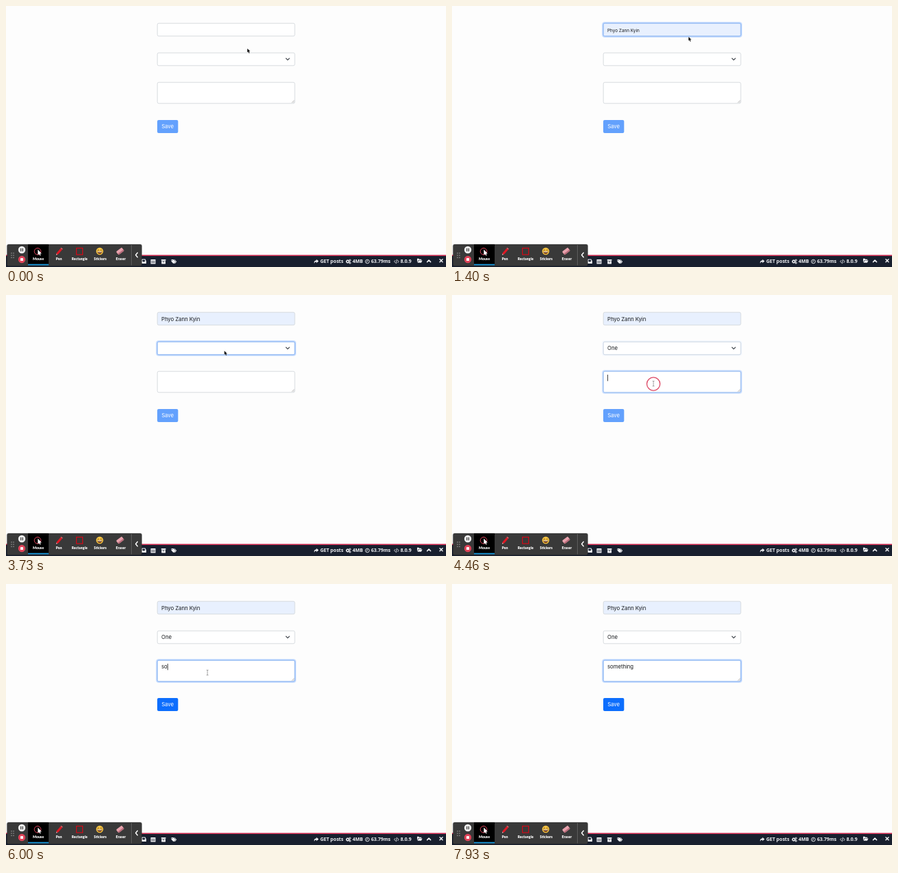
Write an HTML page that moves like this. It is 640 by 380 pixels and loops after 8000 ms.

```html
<!DOCTYPE html>
<html lang="en">
<head>
<meta charset="utf-8">
<title>Form demo</title>
<style>
  html, body { margin: 0; width: 100%; height: 100%; overflow: hidden; background: #fdfdfd; }
  svg { display: block; width: 640px; height: 380px; }
  .form { font: 7.7px Inter, sans-serif; fill: #15181b; }
  .box { fill: #fff; stroke: #ced3d9; stroke-width: .8; }
  .glow { fill: none; stroke: #0d6efd; stroke-opacity: .25; stroke-width: 2; }
  .edge { fill: none; stroke: #86b7fe; stroke-width: .8; }
  .line { fill: none; stroke-linecap: round; stroke-linejoin: round; }
  .status { font: 700 7px "Open Sans", sans-serif; fill: #f1f2f5; }
  .tools { font: 900 5.2px Lato, sans-serif; fill: #fff; text-anchor: middle; }
</style>
</head>
<body>
<svg viewBox="0 0 640 380">
  <rect width="640" height="380" fill="#fdfdfd"/>

  <g class="form">
    <g id="fields"></g>
    <path class="line" d="M407.2 76.1l2.5 2.6 2.5-2.6" stroke="#343a40" stroke-width="1.1"/>
    <path class="line" d="M416 140.5l3-3M418 140.5l1-1" stroke="#888" stroke-width=".6"/>
    <text id="name" x="226" y="37.6">Phyo Zann Kyin</text>
    <text id="choice" x="226" y="80.4">One</text>
    <text id="note" x="226" y="123.4"></text>
    <rect id="caret" y="116" width=".8" height="9.3" fill="#111"/>
    <rect id="button" x="220" y="166" width="30.3" height="19" rx="2" fill="#0d6efd"/>
    <text x="235.1" y="178.4" text-anchor="middle" fill="#fff">Save</text>
  </g>

  <g class="status">
    <rect y="363" width="640" height="17" fill="#181f2e"/>
    <rect y="362.4" width="640" height="1.6" fill="#cb2b50"/>
    <path d="M196 373v-1.5l1.5-3h5l1.5 3v3.5h-8zM198 371.5h1l.6 1h1.6l.6-1h.8l-.8-2h-3z" fill-rule="evenodd"/>
    <path d="M210.5 369h7v6.5h-7zM211.3 371h5.4v.8h-5.4zM211.3 373h5.4v.8h-5.4z" fill-rule="evenodd"/>
    <path d="M225.8 369h6.6v1.8h-6.6zM226.2 371.3h5.8v4.2h-5.8zM228 372h2.2v.7H228z" fill-rule="evenodd"/>
    <path d="M240.5 369h3l3 3.2-2.8 3-3.2-3.2zM244.4 369h.8l3 3.2-2.8 3-.7-.6 2.2-2.4z"/>
    <circle cx="241.8" cy="370.3" r=".6" fill="#181f2e"/>
    <path d="M448 375c0-3.5 1.2-4.6 3.5-4.6v-1.7l3.2 2.8-3.2 2.8v-1.7c-1.7 0-2.7.5-3.5 2.4z"/>
    <text x="457" y="374.3">GET posts</text>
    <g fill="none" stroke="#f1f2f5">
      <circle cx="497" cy="372" r="1.7" stroke-width="1.3"/>
      <circle cx="497" cy="372" r="2.5" stroke-width=".8" stroke-dasharray="1 .96"/>
      <circle cx="500.3" cy="370.2" r="1.1" stroke-width="1"/>
      <circle cx="500.3" cy="374" r="1.1" stroke-width="1"/>
      <circle cx="525.6" cy="372" r="2.8" stroke-width=".9"/>
      <path class="line" d="M525.6 370.3v2l-1 .3" stroke-width=".7"/>
      <path class="line" d="M566.3 370.2l-1.7 1.8 1.7 1.8M569.7 370.2l1.7 1.8-1.7 1.8M568.6 369.2l-1.2 5.6" stroke-width=".8"/>
      <path class="line" d="M612.6 372.6l2.5-2.5 2.5 2.5" stroke-width="1.5"/>
      <path class="line" d="M631 368.7l4 4M635 368.7l-4 4" stroke-width="1.5"/>
    </g>
    <text x="504" y="374.3">4MB</text>
    <text x="531" y="374.3">63.79ms</text>
    <text x="573.8" y="374.3">8.0.9</text>
    <path d="M598 373.2v-5.4h2.4l.8.9h3v1.2h-4.4zM598.6 373.8l1.6-3.2h5.4l-1.6 3.2z"/>
  </g>

  <g class="tools">
    <rect x="1" y="346.5" width="197" height="32.5" rx="3" fill="#000" opacity=".25"/>
    <rect x="1.5" y="347" width="196" height="31.5" rx="2.5" fill="#393939"/>
    <rect x="32" y="347" width="30" height="30.5" fill="#000"/>
    <rect x="32" y="375.7" width="30" height="1.8" fill="#1a9be0"/>
    <path d="M8 359.2v8M11 359.2v8" stroke="#aaa" stroke-width="1.2" stroke-dasharray="1.2 2.1"/>
    <circle cx="23" cy="355" r="5.2" fill="#f2f2f2"/>
    <path d="M21.7 352.8v4.4M24.3 352.8v4.4" stroke="#333" stroke-width="1.2"/>
    <circle cx="23" cy="369" r="5.2" fill="#de4358"/>
    <rect x="21" y="367" width="4" height="4" rx=".6"/>
    <circle cx="46" cy="357.3" r="4.8" fill="none" stroke="#e2455c" stroke-width="1"/>
    <path d="M46.3 354.6v8l1.8-1.7 1.3 2.6 1.2-.6-1.2-2.5h2.4z"/>
    <path d="M73 362.5l.8-3.2 5.4-6.3 2.4 2-5.4 6.3z" fill="#e01824"/>
    <path d="M79.4 352.7l.9-1 2.4 2-.9 1z" fill="#f5606a"/>
    <path d="M73 362.5l.5-1.8 1.2 1z" fill="#fff"/>
    <rect x="102.5" y="352.5" width="9" height="9.5" fill="none" stroke="#d20a18" stroke-width="1.2"/>
    <circle cx="136.3" cy="357" r="5.2" fill="#f6c443"/>
    <path class="line" d="M133.2 355.6q1-1.3 2 0M137.4 355.6q1-1.3 2 0" stroke="#5c3510" stroke-width=".8"/>
    <path d="M132.8 357.4h7q-.5 3.4-3.5 3.4t-3.5-3.4z" fill="#6b3210"/>
    <path d="M133.3 357.4h6l-.3 1.1h-5.4z"/>
    <g transform="rotate(-38 166 357)">
      <rect x="160.8" y="354" width="10.4" height="6" rx="1.2" fill="#e9a2ad"/>
      <path d="M161 358h10v.8q0 1.2-1.2 1.2h-7.6q-1.2 0-1.2-1.2z" fill="#b96c7b"/>
    </g>
    <text x="47" y="370.4">Mouse</text>
    <text x="77" y="370.4">Pen</text>
    <text x="107" y="370.4">Rectangle</text>
    <text x="137" y="370.4">Stickers</text>
    <text x="167" y="370.4">Eraser</text>
    <path d="M182.5 348v29.5" stroke="#666" stroke-width=".8"/>
    <path class="line" d="M191.3 359.2l-2.7 3.3 2.7 3.3" stroke="#fff" stroke-width="1.4"/>
  </g>

  <circle id="ring" r="9.6" fill="none" stroke="#dc4663" stroke-width="1.3"/>
  <g id="pointer">
    <path id="arrow" d="M0 0v5.6l1.3-1.1 1 2.2 1.1-.5-1-2.1h1.8z" fill="#111" stroke="#fff" stroke-width=".5" paint-order="stroke"/>
    <path id="beam" class="line" d="M-1-3.8q1 0 1 .8 0-.8 1-.8M0-3v6M-1 3.8q1 0 1-.8 0 .8 1 .8" stroke="#666" stroke-width=".6"/>
  </g>
</svg>

<script>
const LOOP = 8000;
const NOTE = "something";
const $ = id => document.getElementById(id);
const clamp = v => Math.min(1, Math.max(0, v));
const ease = v => v * v * (3 - 2 * v);
const show = (el, on) => el.setAttribute("visibility", on ? "visible" : "hidden");

// top, height, focus time, blur time
const fields = [[25, 19, 500, 2462], [68, 19, 2462, 4335], [111, 31, 4335, Infinity]]
  .map(([y, h, on, off]) => ({ y, h, on, off }));
const clicks = [[480, 345, 31], [2400, 318, 82], [4340, 293, 129.5]];
const path = [[0, 351, 62], [60, 351, 62], [450, 345, 31], [900, 345, 31], [1230, 344, 45],
  [1900, 344, 45], [2340, 317.6, 81.3], [3980, 317.6, 81.3], [4300, 293, 129]];
const keyTimes = [5680, 5930, 6240, 6450, 6680, 6880, 7040, 7200, 7350];
const RING_TIME = 190, FADE = 150, BLINK = 500;

const rect = (cls, y, h, grow) =>
  `<rect class="${cls}" x="${220.2 - grow}" y="${y + .2 - grow}" width="${199.8 + 2 * grow}" height="${h - .4 + 2 * grow}" rx="${2 + grow}"/>`;
$("fields").innerHTML = fields.map(({ y, h }) =>
  `${rect("box", y, h, 0)}<g>${rect("glow", y, h, 1)}${rect("edge", y, h, 0)}</g>`).join("");
const boxes = $("fields").querySelectorAll(".box");
const halos = $("fields").querySelectorAll("g");

function pointerAt(t) {
  const i = path.findIndex(p => p[0] > t);
  if (i < 0) return path[path.length - 1].slice(1);
  const [t0, x0, y0] = path[i - 1], [t1, x1, y1] = path[i];
  const k = ease((t - t0) / (t1 - t0));
  return [x0 + (x1 - x0) * k, y0 + (y1 - y0) * k];
}

function draw(t) {
  fields.forEach((f, i) =>
    halos[i].setAttribute("opacity", clamp((t - f.on) / FADE) - clamp((t - f.off) / FADE)));

  const previewed = t >= 1230, filled = t >= 1800;
  boxes[0].style.fill = previewed ? "#e8f0fe" : "#fff";
  show($("name"), previewed);
  $("name").style.fontSize = filled ? "7.7px" : "6.4px";
  show($("choice"), t >= 3880);

  const typed = keyTimes.filter(k => k <= t).length;
  $("note").textContent = NOTE.slice(0, typed);
  $("button").setAttribute("opacity", .64 + .36 * clamp((t - keyTimes[0]) / FADE));

  const inName = t >= 500 && t < 1230, inNote = t >= 4400;
  const since = inName ? 500 : typed ? keyTimes[typed - 1] : 4400;
  show($("caret"), (inName || inNote) && Math.floor((t - since) / BLINK) % 2 === 0);
  $("caret").setAttribute("x", 226.1 + (typed ? $("note").getComputedTextLength() : 0));
  $("caret").setAttribute("y", inName ? 30 : 116);

  const [x, y] = pointerAt(t);
  const overText = (y > 25 && y < 44) || y > 111;
  $("pointer").setAttribute("transform", `translate(${x} ${y})`);
  const visible = t < 6400;
  show($("arrow"), visible && !overText);
  show($("beam"), visible && overText);

  const click = clicks.find(c => t >= c[0] && t < c[0] + RING_TIME);
  show($("ring"), click);
  if (click) {
    $("ring").setAttribute("cx", click[1]);
    $("ring").setAttribute("cy", click[2]);
  }
}

function tick() {
  draw(performance.now() % LOOP);
  requestAnimationFrame(tick);
}
tick();
</script>
</body>
</html>
```
